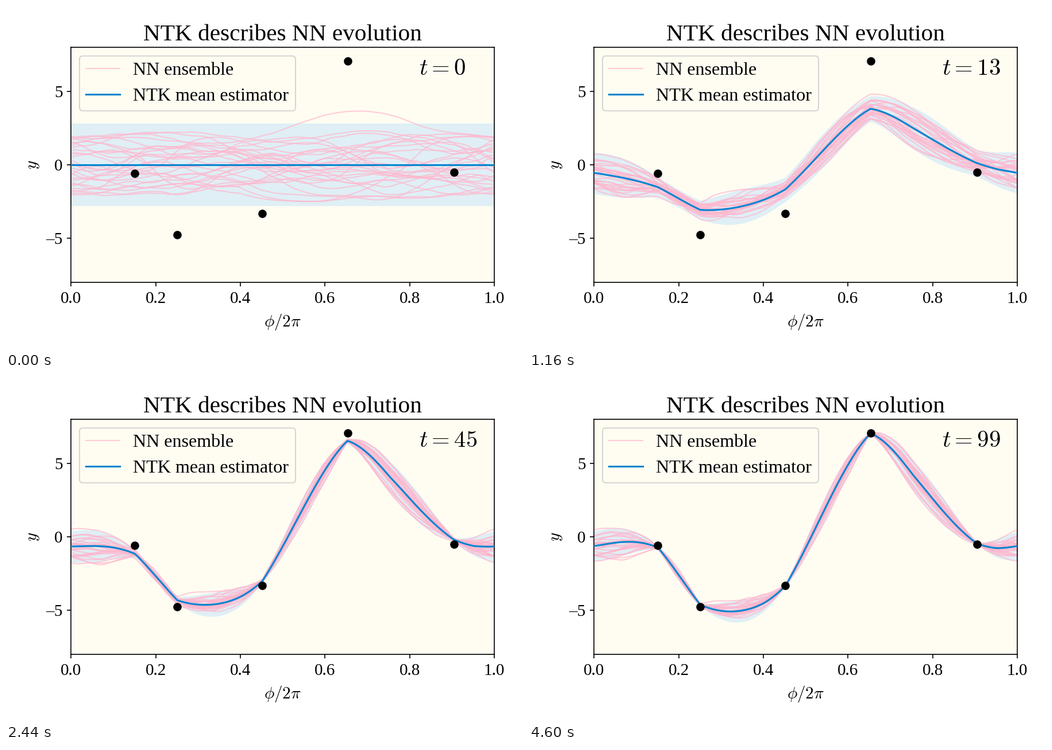
These frames come from a looping animation (900x600 px, 4640 ms). A matplotlib script:

```python
import numpy as np
import matplotlib.pyplot as plt
from matplotlib.animation import FuncAnimation
from matplotlib.patches import FancyBboxPatch

plt.rcParams["font.family"] = "Liberation Serif"
plt.rcParams["mathtext.fontset"] = "cm"

W, H, DPI = 900, 600, 150
CREAM, BLUE, PINK, SKY = "#fffdf2", "#0485d1", "#ffb7ce", "#95d0fc"
HOLD, STEPS, RATE = 17, 99, 0.026
LEFT, TOP, WIDTH, HEIGHT = 113.1, 72, 737, 410
SMALL = 14
LIMIT = 2.9


# Infinite-width kernels of a ReLU network with two hidden layers on a circle
def arc0(u):
    return 1 - np.arccos(np.clip(u, -1, 1)) / np.pi


def arc1(u):
    u = np.clip(u, -1, 1)
    return np.sqrt(1 - u * u) / np.pi + u * arc0(u)


grid = np.linspace(0, 1, 200)
u = np.cos(2 * np.pi * (grid[:, None] - grid))
u1 = arc1(u)
prior = 2 * arc1(u1)
tangent = arc1(u1) + (u1 + u * arc0(u)) * arc0(u1)

train = np.array([30, 50, 90, 130, 180])
target = np.array([-0.6, -4.76, -3.32, 7.06, -0.5])
pairs = np.ix_(train, train)
rates, modes = np.linalg.eigh(tangent[pairs])
projected = tangent[:, train] @ modes


def response(t):
    """Matrix taking training residuals to the change of the output."""
    return (projected * ((1 - np.exp(-RATE * rates * t)) / rates)) @ modes.T


def spread(r):
    """Standard deviation of the trained ensemble for a given response."""
    var = (np.diag(prior) - 2 * np.sum(r * prior[:, train], axis=1)
           + np.sum((r @ prior[pairs]) * r, axis=1))
    return np.sqrt(np.maximum(var, 0))


# Initial networks: random draws from the prior, each pinned at one place
rng = np.random.default_rng(4)
values, vectors = np.linalg.eigh(prior)
root = vectors * np.sqrt(np.maximum(values, 0))


def draw_network(at, value, scale=1.0):
    free = scale * root @ rng.standard_normal(len(grid))
    return free + prior[:, at] * (value - free[at]) / prior[at, at]


networks = [LIMIT * np.tanh(draw_network(0, start) / LIMIT)
            for start in np.linspace(-2.5, 2.3, 28)]
networks.append(draw_network(133, 3.65, 0.3))
networks = np.array(networks).T

fig = plt.figure(figsize=(W / DPI, H / DPI), dpi=DPI, facecolor="white")
ax = fig.add_axes([LEFT / W, 1 - (TOP + HEIGHT) / H, WIDTH / W, HEIGHT / H],
                  facecolor=CREAM)
ax.set(xlim=(0, 1), ylim=(-8, 8))
ax.set_xticks(np.linspace(0, 1, 6), labels=[""] * 6)
ax.set_yticks([-5, 0, 5], labels=[""] * 3)

band = ax.fill_between(grid, -grid, grid, color=SKY, alpha=0.3, lw=0, zorder=1)
lines = ax.plot(grid, networks, color=PINK, alpha=0.7, lw=1, zorder=2)
mean_line, = ax.plot(grid, 0 * grid, color=BLUE, lw=1.5, zorder=3)
ax.plot(grid[train], target, "ko", ms=6, zorder=4)

# Overlay in pixel coordinates for the legend and all text
page = fig.add_axes([0, 0, 1, 1], zorder=5)
page.set(xlim=(0, W), ylim=(H, 0))
page.axis("off")


def label(x, y, text, size=SMALL, ha="center", va="baseline", **kw):
    return page.text(x, y, text, fontsize=size, ha=ha, va=va, **kw)


def legend_row(y, text, **style):
    page.plot([139, 198], [y, y], **style)
    label(221, y + 10.7, text, 15.4, "left")


page.add_patch(FancyBboxPatch((128, 87.2), 376, 95.6, fc=CREAM, ec="0.8",
                              lw=1, alpha=0.8,
                              boxstyle="round,pad=0,rounding_size=5.8"))
legend_row(109, "NN ensemble", color=PINK, alpha=0.7, lw=1)
legend_row(154, "NTK mean estimator", color=BLUE, lw=1.5)

middle = LEFT + WIDTH / 2
label(middle, 60.5, "NTK describes NN evolution", 19.8)
label(middle, 559.4, r"$\phi/2\pi$")
label(48, 277, "$y$", va="center", rotation=90)
for x in np.linspace(0, 1, 6):
    label(LEFT + WIDTH * x, 518, f"{x:.1f}")
for y in (-5, 0, 5):
    label(98.5, TOP + HEIGHT * (8 - y) / 16 + 10,
          str(y).replace("-", "\u2013"), ha="right")
clock = label(719, 120, "$t=0$", 19.6, "left")


def update(frame):
    t = max(0, frame - HOLD + 1)
    r = response(t)
    mean = r @ target
    half = 2 * spread(r)
    outline = np.concatenate([mean + half, (mean - half)[::-1]])
    around = np.concatenate([grid, grid[::-1]])
    band.set_verts([np.column_stack([around, outline])])
    mean_line.set_ydata(mean)
    for line, start in zip(lines, networks.T):
        line.set_ydata(start + mean - r @ start[train])
    clock.set_text(f"$t={t}$")
    return [band, mean_line, clock, *lines]


anim = FuncAnimation(fig, update, frames=HOLD + STEPS, interval=40,
                     repeat=True, repeat_delay=0)
plt.show()
```
